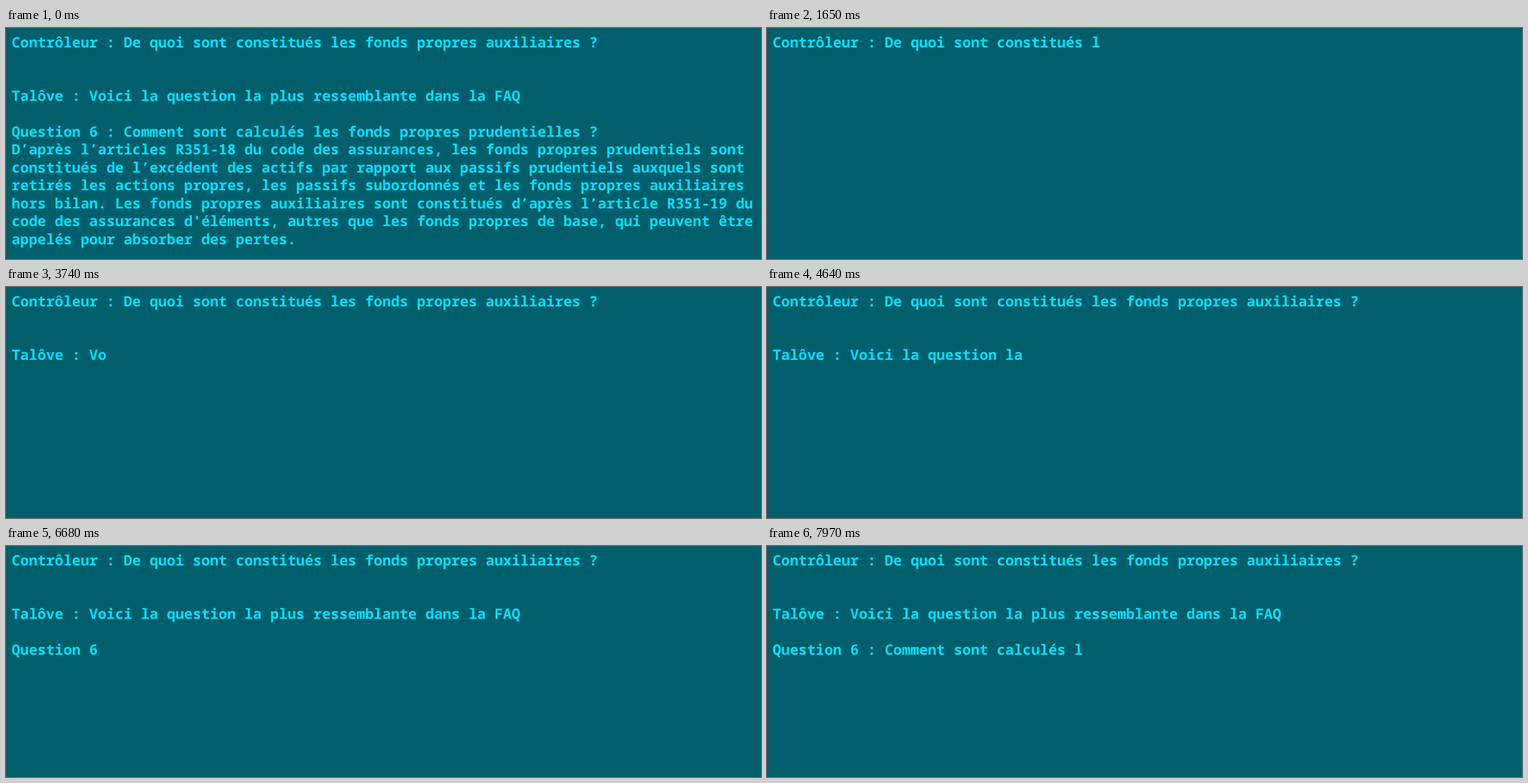
Animation, 1280 px wide and 393 px high, one loop 8 s. Source, as an HTML page:

```html
<!DOCTYPE html>
<html lang="fr">
<head>
<meta charset="utf-8">
<title>Dialogue FAQ</title>
<style>
html, body { margin: 0; width: 100%; height: 100%; overflow: hidden; background: #005f6b; }
svg { display: block; width: 100vw; height: 100vh; }
text {
  font: 600 24.36px "Noto Sans Mono", "DejaVu Sans Mono", monospace;
  fill: #00dffc; white-space: pre; text-rendering: geometricPrecision;
  font-variant-ligatures: none;
}
</style>
</head>
<body>
<svg id="stage" viewBox="0 0 1280 393" xmlns="http://www.w3.org/2000/svg">
  <rect width="1280" height="393" fill="#005f6b"/>
  <rect id="cursor" width="4.2" height="30.4" fill="#00dffc"/>
</svg>
<script>
const LOOP = 8000, HOLD = 450;
const FIRST_KEY = 14, KEY_MS = 49.8;    // typing resumes at this key, at a steady pace
const BLINK = 11.4, BLINK_SHIFT = 0.9;  // cursor rhythm, in keys
const LEFT = 9.5, BASE = 32.6, CELL = 14.616, LEADING = 30.45;

const typed = [
  { row: 0, str: "Contrôleur : De quoi sont constitués les fonds propres auxiliaires ?" },
  { row: 3, str: "Talôve : Voici la question la plus ressemblante dans la FAQ" },
  { row: 5, str: "Question 6 : Comment sont calculés les fonds propres prudentielles ?" }
];
const answer = [
  "D’après l’articles R351-18 du code des assurances, les fonds propres prudentiels sont",
  "constitués de l’excédent des actifs par rapport aux passifs prudentiels auxquels sont",
  "retirés les actions propres, les passifs subordonnés et les fonds propres auxiliaires",
  "hors bilan. Les fonds propres auxiliaires sont constitués d’après l’article R351-19 du",
  "code des assurances d'éléments, autres que les fonds propres de base, qui peuvent être",
  "appelés pour absorber des pertes."
];

const stage = document.getElementById("stage");
const cursor = document.getElementById("cursor");

function addLine(row, str) {
  const el = document.createElementNS("http://www.w3.org/2000/svg", "text");
  el.setAttribute("x", LEFT);
  el.setAttribute("y", BASE + row * LEADING);
  el.textContent = str;
  stage.appendChild(el);
  return el;
}
for (const line of typed) line.el = addLine(line.row, line.str);
const answerEls = answer.map((str, i) => addLine(6 + i, str));

function show(el, on) {
  el.setAttribute("visibility", on ? "visible" : "hidden");
}

function render(t) {
  const full = t < HOLD;
  const keys = full ? Infinity : FIRST_KEY + Math.floor((t - HOLD) / KEY_MS);
  let left = keys, row = 0, col = 0;
  for (const line of typed) {
    const count = Math.max(0, Math.min(line.str.length, left));
    const str = line.str.slice(0, count);
    if (line.el.textContent !== str) line.el.textContent = str;
    if (left >= 0) { row = line.row; col = count; }
    left -= line.str.length + 1;  // a line break costs one key
  }
  for (const el of answerEls) show(el, full);
  show(cursor, !full && (keys + BLINK_SHIFT) % BLINK < 1);
  cursor.setAttribute("x", LEFT + col * CELL + 4.4);
  cursor.setAttribute("y", 8.4 + row * LEADING);
}

let start = null;
function frame(now) {
  if (start === null) start = now;
  render((now - start) % LOOP);
  requestAnimationFrame(frame);
}
render(0);
requestAnimationFrame(frame);
</script>
</body>
</html>
```
